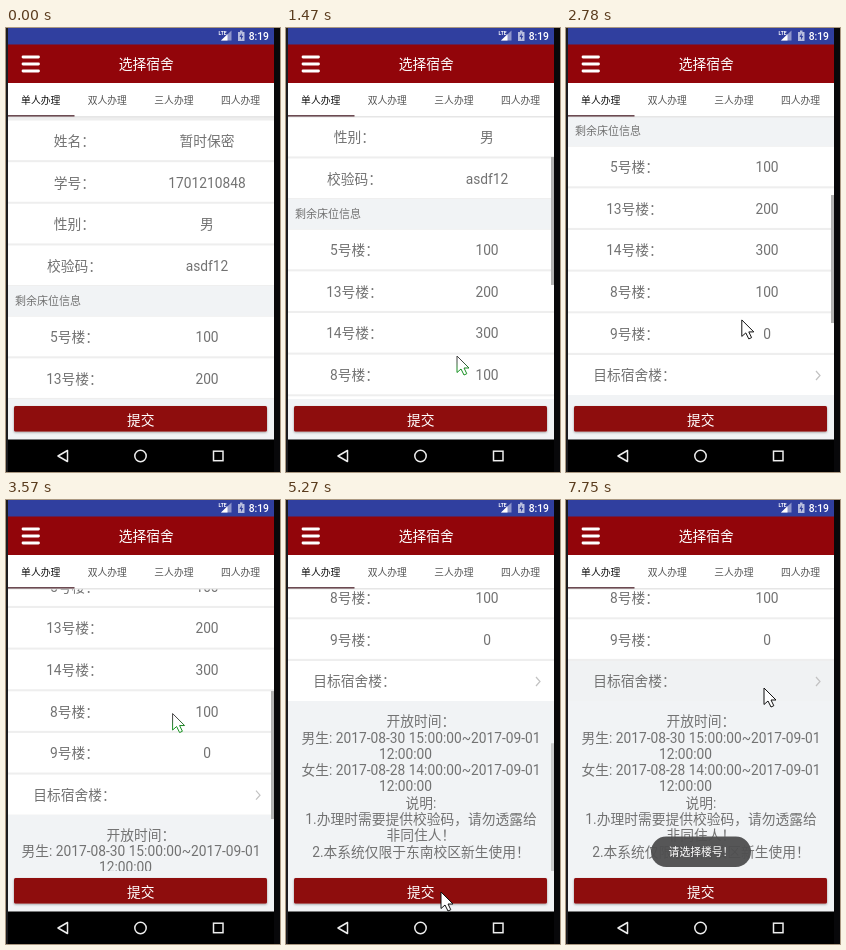
An HTML page for the animation above (8 s loop, 274 px wide and 444 px high).

```html
<!DOCTYPE html>
<html lang="zh-CN">
<head>
<meta charset="utf-8">
<style>
html, body { margin: 0; width: 100%; height: 100%; overflow: hidden; background: #08080a; }
svg { display: block; font: 13.75px Roboto, "Noto Sans CJK SC", "Noto Sans CJK", sans-serif; }
text { text-anchor: middle; white-space: pre; }
</style>
</head>
<body>
<svg width="274" height="444" viewBox="0 0 274 444">
  <defs>
    <clipPath id="view"><rect x="2" y="89" width="266" height="282"/></clipPath>
    <linearGradient id="green" x2="0" y2="1">
      <stop offset=".25" stop-color="#444"/><stop offset=".7" stop-color="#169020"/>
    </linearGradient>
    <filter id="shadow"><feDropShadow dx="0" dy="1" stdDeviation="1" flood-opacity=".35"/></filter>
  </defs>
  <rect width="2" height="444" fill="#1c1c1f"/>
  <rect x="2" y="55" width="266" height="357" fill="#f1f3f5"/>

  <g clip-path="url(#view)">
    <g id="list" fill="#727272"></g>
    <rect id="bar" x="265" width="3" height="128" fill="#b2b2b2"/>
  </g>

  <rect x="2" width="266" height="17" fill="#303f9f"/>
  <g fill="#fff">
    <path d="M215 12.500h10.500v-10z" opacity=".45"/>
    <path d="M215 12.500h6.500v-6.200z"/>
    <text x="216.500" y="7" font-size="5" font-weight="700">LTE</text>
    <path d="M232 4h2v-1.500h2.500V4h2v9H232z" opacity=".65"/>
    <path d="M235.700 5l-2.200 4h1.500v3l2.200-4h-1.500z" fill="#303f9f"/>
    <text x="252.800" y="12" font-size="10.300" font-weight="500">8:19</text>
  </g>

  <rect x="2" y="16.500" width="266" height="38.500" fill="#92050a"/>
  <path d="M17 29h15.500m-15.500 7h15.500m-15.500 7h15.500" stroke="#fff" stroke-width="2.800" stroke-linecap="round"/>
  <text x="140.200" y="41.200" fill="#fff">选择宿舍</text>

  <rect x="2" y="55" width="266" height="34" fill="#fff"/>
  <rect x="2" y="88" width="266" height="1.500" fill="#e6e6e6"/>
  <rect x="2" y="87" width="66.500" height="1.600" fill="#6c4b52"/>
  <g id="tabs" font-size="9.800"></g>

  <g filter="url(#shadow)"><rect x="8" y="378" width="253" height="25.500" rx="1.500" fill="#8e0809"/></g>
  <rect id="flash" x="8" y="378" width="253" height="25.500" rx="1.500" fill="#fff"/>
  <text x="134.800" y="396.500" fill="#fff">提交</text>

  <rect x="2" y="411.500" width="266" height="33"/>
  <g fill="none" stroke="#eee" stroke-width="1.500">
    <path d="M61.500 422.500v11l-9.500-5.500z" stroke-linejoin="round"/>
    <circle cx="134.500" cy="428" r="5.700"/>
    <rect x="207.500" y="423.200" width="9.500" height="9.500"/>
  </g>

  <g id="toast">
    <rect x="85" y="336.500" width="100" height="30.500" rx="15.250" fill="#4e4f50" opacity=".95"/>
    <text x="135" y="355.700" font-size="10.800" fill="#fff">请选择楼号！</text>
  </g>
  <path id="cursor" d="M0 0V16.500L4 13L7 19L9.800 17.700L7 12H12z" fill="#fff" stroke-linejoin="round"/>
</svg>
<script>
const LOOP = 8000, STEP = 77, FIRST = 550, PITCH = 41.65;
const el = id => document.getElementById(id);
const set = (id, attrs) => Object.entries(attrs).forEach(([k, v]) => el(id).setAttribute(k, v));
const mix = (a, b, p) => a + (b - a) * p;
const ramp = (t, from, length) => Math.min(1, Math.max(0, (t - from) / length));

const text = (x, y, s, attrs = '') => `<text x="${x}" y="${y + 5}" ${attrs}>${s}</text>`;
const box = (y, h, attrs = 'fill="#fff"') => `<rect x="2" y="${y}" width="266" height="${h}" ${attrs}/>`;
const rows = (top, items) => items.map(([label, value], i) => {
  const y = top + i * PITCH;
  return box(y, 39.6) + text(68.5, y + 20.4, label + '：') + text(201, y + 20.4, value);
}).join('');

const notes = ['开放时间：',
  '男生: 2017-08-30 15:00:00~2017-09-01', '12:00:00',
  '女生: 2017-08-28 14:00:00~2017-09-01', '12:00:00',
  '说明:', '1.办理时需要提供校验码，请勿透露给', '非同住人！', '2.本系统仅限于东南校区新生使用！'];

el('list').innerHTML =
  box(89, 169, 'fill="#eee"') + box(288, 249, 'fill="#eee"') +
  rows(92.5, [['姓名', '暂时保密'], ['学号', '1701210848'], ['性别', '男'], ['校验码', 'asdf12']]) +
  text(9, 271.5, '剩余床位信息', 'font-size="11" style="text-anchor:start"') +
  rows(288.7, [['5号楼', 100], ['13号楼', 200], ['14号楼', 300], ['8号楼', 100], ['9号楼', 0]]) +
  box(497, 40, 'id="target"') + text(68.5, 517.3, '目标宿舍楼：') +
  '<path d="M250 513l4 4.500-4 4.500" fill="none" stroke="#c2c2c2" stroke-width="1.200"/>' +
  notes.map((s, i) => text(s === '12:00:00' ? 119.5 : 135, 557.2 + i * 16.3, s)).join('');

el('tabs').innerHTML = ['单人办理', '双人办理', '三人办理', '四人办理'].map((s, i) =>
  text(34.7 + i * 66.6, 70.7, s, `fill="${i ? '#555' : '#111'}"`)).join('');

// Each stop is a drag up the list; the last one is the submit button.
const DRAG = 330, RETURN = 529;
const stops = [
  { start: 600, x: 165, y: 377, scroll: 0 },
  { start: 2010, x: 171, y: 328, scroll: 87 },
  { start: 3337, x: 181, y: 315, scroll: 170 },
  { start: 4350, x: 178, y: 296, scroll: 250 },
  { start: 6580, x: 155, y: 392, scroll: 336 }
];

function pointer(t) {
  const i = Math.max(0, stops.filter(s => s.start <= t).length - 1);
  const from = stops[i], to = stops[i + 1];
  if (!to) {
    const p = ramp(t, from.start, 900);
    return { x: mix(from.x, 198, p), y: mix(from.y, 188, p), scroll: from.scroll };
  }
  const drag = ramp(t, from.start, DRAG), back = ramp(t, from.start + DRAG, RETURN);
  return {
    x: mix(from.x - 22 * drag, to.x, back),
    y: mix(from.y - 155 * drag, to.y, back),
    scroll: mix(from.scroll, to.scroll, drag),
    pressed: back === 0 || (back === 1 && i + 2 < stops.length)
  };
}

function draw(now) {
  const time = now % LOOP;
  // The screen refreshes in even steps.
  const t = FIRST + Math.floor((time - FIRST + 15) / STEP) * STEP;
  const { x, y, scroll, pressed } = pointer(t);
  set('list', { transform: `translate(0 ${-scroll})` });
  set('bar', { y: 89 + scroll * .459, opacity: ramp(t, 600, 80) * (1 - ramp(t, 5150, 250)) });
  set('flash', { opacity: .14 * Math.sin(Math.PI * ramp(t, 6040, 410)) });
  set('toast', { opacity: ramp(t, 6350, 410) });
  set('target', { fill: time < 7750 ? '#fff' : '#f0f2f3' });
  set('cursor', {
    transform: `translate(${x} ${y})`,
    stroke: pressed ? 'url(#green)' : '#111',
    visibility: time < FIRST ? 'hidden' : 'visible'
  });
}

const start = performance.now();
(function frame() {
  draw(performance.now() - start);
  requestAnimationFrame(frame);
})();
</script>
</body>
</html>
```
